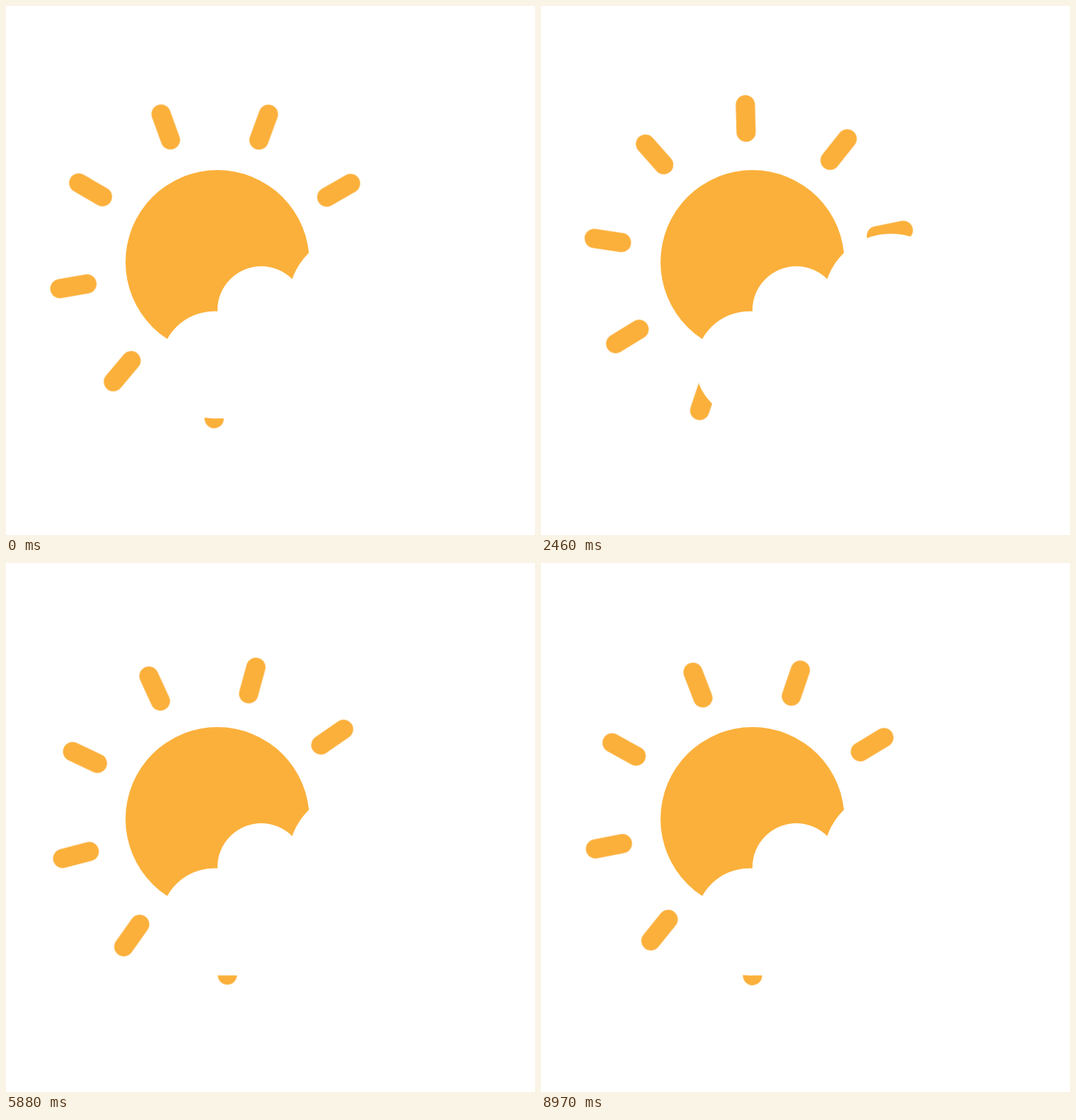
Animation, 748 px wide and 748 px high, one loop 9000 ms. Source, as an HTML page:

```html
<!DOCTYPE html>
<html lang="en">
<head>
<meta charset="utf-8">
<title>Sun and cloud</title>
<style>
  html, body { margin: 0; width: 100%; height: 100%; overflow: hidden; background: #fff; }
  svg { display: block; width: 100%; height: 100%; }
  #sun { fill: #fbb03b; }
  #rays { stroke: #fbb03b; stroke-width: 27.2; stroke-linecap: round; transform-origin: 294.8px 361.5px; }
  #cloud { fill: #fff; }
</style>
</head>
<body>
<svg viewBox="0 0 748 748">
  <circle id="sun" cx="299" cy="362" r="130"/>
  <g id="rays"></g>
  <g id="cloud">
    <circle cx="294.3" cy="507.5" r="75.8"/>
    <circle cx="361" cy="430" r="62"/>
    <circle cx="495" cy="417.7" r="95.7"/>
    <rect x="294" y="431.8" width="296" height="151.4"/>
  </g>
</svg>
<script>
  const CENTER = { x: 294.8, y: 361.5 };
  const RAY_COUNT = 9, INNER = 183, OUTER = 222;
  const START = 20.1, LOOP = 9000, STEP = 30;
  const rays = document.getElementById('rays');

  for (let i = 0; i < RAY_COUNT; i++) {
    const ray = document.createElementNS('http://www.w3.org/2000/svg', 'line');
    const attrs = {
      x1: CENTER.x, y1: CENTER.y - INNER,
      x2: CENTER.x, y2: CENTER.y - OUTER,
      transform: `rotate(${i * 360 / RAY_COUNT} ${CENTER.x} ${CENTER.y})`
    };
    for (const name in attrs) ray.setAttribute(name, attrs[name]);
    rays.append(ray);
  }

  // One full clockwise turn per loop, in 30 ms steps.
  rays.animate(
    [{ transform: `rotate(${START}deg)` }, { transform: `rotate(${START + 360}deg)` }],
    { duration: LOOP, iterations: Infinity, easing: `steps(${LOOP / STEP}, end)` }
  );
</script>
</body>
</html>
```
